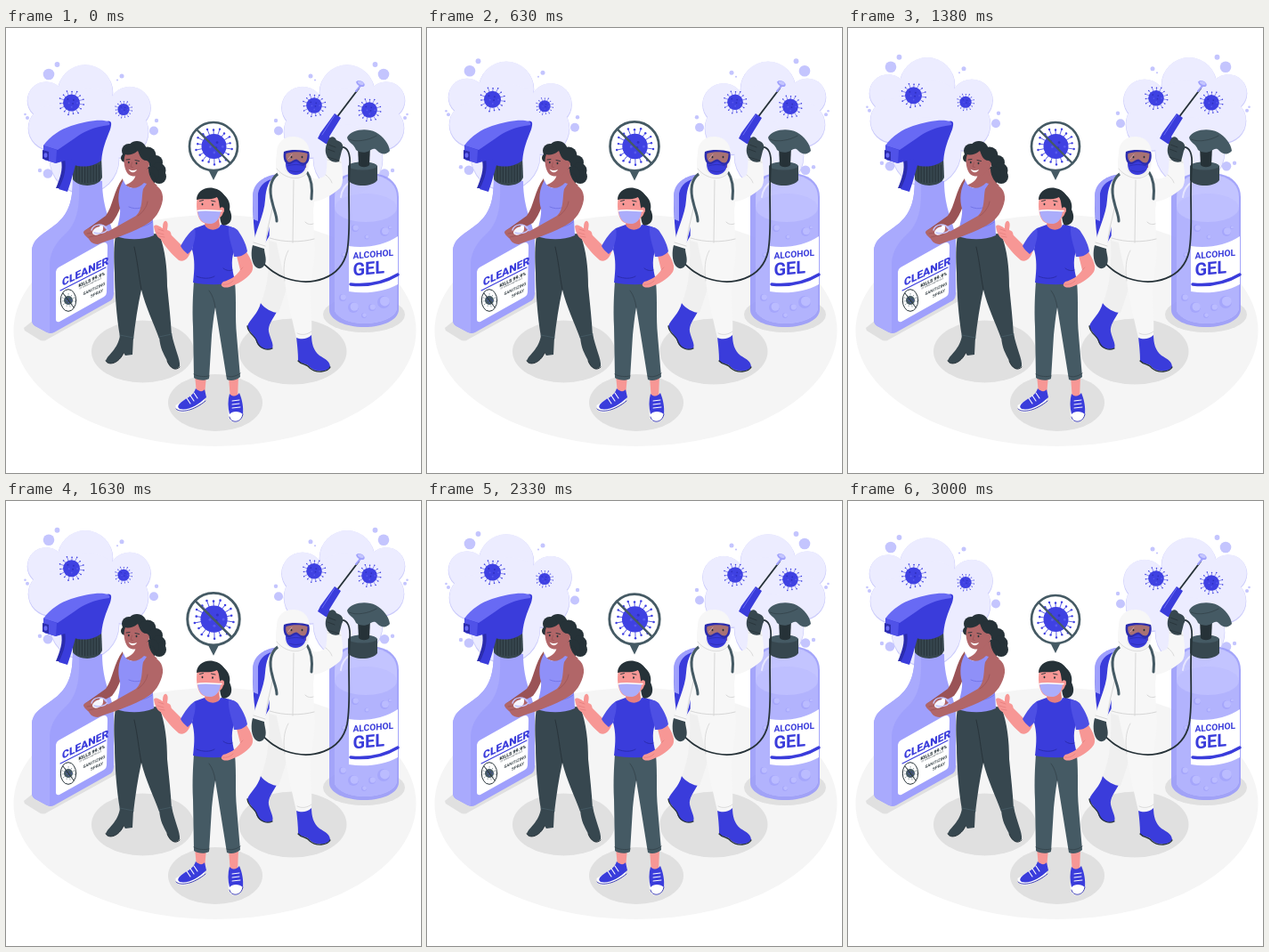
An HTML page with a canvas that plays this animation: 466 px wide and 500 px high, repeating every 3040 ms.

```html
<!DOCTYPE html>
<html lang="en">
<head>
<meta charset="utf-8">
<title>Sanitizing team</title>
<style>
html, body { margin: 0; width: 100%; height: 100%; overflow: hidden; background: #fff; }
canvas { display: block; width: 466px; height: 500px; }
</style>
</head>
<body>
<canvas id="stage"></canvas>
<script>
const canvas = document.getElementById('stage');
const ctx = canvas.getContext('2d');
const ratio = window.devicePixelRatio || 1;
canvas.width = 466 * ratio;
canvas.height = 500 * ratio;

const BLUE = '#3a3cdb', NAVY = '#2b2cae', SKY = '#686af4', LILAC = '#9fa0fc', PALE = '#ececff';
const SLATE = '#455a64', DARK = '#37474f', INK = '#263238';
const BROWN = '#b16668', BROWN2 = '#9a5356', SKIN = '#f79795', SKIN2 = '#e57f7f';
const SUIT = '#f7f7f7', SUIT2 = '#efefef', SUIT3 = '#d6d6d6';

function fill(color, d) {
  ctx.fillStyle = color;
  ctx.fill(new Path2D(d));
}
function line(color, width, d) {
  ctx.strokeStyle = color;
  ctx.lineWidth = width;
  ctx.stroke(new Path2D(d));
}
function oval(color, x, y, rx, ry = rx, turn = 0) {
  ctx.fillStyle = color;
  ctx.beginPath();
  ctx.ellipse(x, y, rx, ry, turn, 0, 7);
  ctx.fill();
}
function ring(color, width, x, y, rx, ry = rx) {
  ctx.strokeStyle = color;
  ctx.lineWidth = width;
  ctx.beginPath();
  ctx.ellipse(x, y, rx, ry, 0, 0, 7);
  ctx.stroke();
}
function label(str, x, y, size, weight, slope, color = BLUE) {
  ctx.save();
  ctx.transform(1, slope, 0, 1, x, y);
  ctx.font = `${weight} condensed ${size}px Roboto, "Open Sans", sans-serif`;
  ctx.fillStyle = color;
  ctx.fillText(str, 0, 0);
  ctx.restore();
}

function virus(x, y, r, spikes = 15, body = '#3f41e2') {
  for (let i = 0; i < spikes; i++) {
    const a = i / spikes * Math.PI * 2 + 0.15;
    const len = r * (i % 2 ? 1.32 : 1.46);
    const px = x + Math.cos(a) * len, py = y + Math.sin(a) * len;
    line(body, r * 0.06, `M${x} ${y}L${px} ${py}`);
    oval(body, px, py, r * 0.085);
  }
  oval(body, x, y, r);
  for (let i = 0; i < 6; i++) {
    const a = i * 2.4 + 0.6, d = r * (0.2 + 0.1 * i);
    oval(i % 2 ? '#5759ec' : '#3031c0', x + Math.cos(a) * d, y + Math.sin(a) * d, r * 0.1);
  }
}

const LOBES = [[89, 72, 31], [45, 81, 21], [139, 89, 23.5], [50, 112, 25], [130, 116, 30], [92, 112, 45], [88, 147, 39]];
const DROPS = [[48, 52, 6.3], [57.5, 41, 2.9], [130, 54, 2.5], [125, 58.5, 1.1], [166, 115.5, 5],
  [169, 104, 2.2], [24, 101, 2], [21.5, 97, 1.3], [47, 163.5, 5.3], [38, 160, 2.2]];

function cloud(flip) {
  const at = x => flip ? 472 - x : x;
  for (const [x, y, r] of LOBES) oval('#c9c9fb', at(x), y + 0.8, r + 0.3);
  for (const [x, y, r] of LOBES) oval(PALE, at(x), y, r - 0.2);
  for (const [x, y, r] of DROPS) oval('#c4c5fe', at(x), y, r);
}

function ground() {
  oval('#f5f5f5', 234.5, 340, 226, 130);
}

function shadows() {
  oval('#e0e0e0', 153.5, 363.5, 57.5, 35);
  oval('#e0e0e0', 235, 421, 53, 32);
  oval('#e0e0e0', 322, 363.5, 60.5, 37);
}

function sprayBottle() {
  fill('#e0e0e0', 'M20 337L30 329L122 297L124 307L46 350Q42 353 37 350L21 340Z');
  fill(LILAC, 'M75 165C75 190 73 205 58 219C42 232 29 236 29 252L29 328Q29 333 33 335L46 342Q50 344 54 342L118 306Q121 303 121 298L121 238C120 220 108 205 108 172Z');
  fill('#a9aafd', 'M75 165C75 190 73 205 58 219C42 232 29 236 29 252L29 328Q29 333 33 335L46 342L49 342L49 264C50 250 57 240 68 230C80 218 83 200 82 175Z');
  // label
  fill('#fff', 'M56 274Q56 271 59 269L107 242Q114 239 114 246L113 297Q113 300 110 302L60 330Q56 331 56 327Z');
  label('CLEANER', 63, 290, 12, 800, -0.48);
  line(BLUE, 1.1, 'M61 295L112 269');
  label('KILLS 99.9%', 81.5, 291.5, 5.2, 900, -0.48, INK);
  label('OF GERMS AND MOULD', 82.5, 293.7, 2.3, 400, -0.48, INK);
  label('SANITIZING', 86.5, 300.5, 4.6, 500, -0.48, INK);
  label('SPRAY', 95, 303, 4.6, 500, -0.48, INK);
  virus(70, 306, 5, 11, SLATE);
  ring(INK, 1, 70, 306, 8.7, 12.3);
  line(INK, 1, 'M64 298L76 314');
  // collar
  fill(DARK, 'M75 150L107 143L108 168C104 179 82 180 75 170Z');
  for (let x = 79; x < 107; x += 3.2) line(INK, 0.9, `M${x} 154L${x} ${174 - Math.abs(x - 90) * 0.15}`);
  // head and trigger
  fill(NAVY, 'M62 149L74 146C73 160 68 172 64 180L56 180C61 168 64 159 62 149Z');
  fill(BLUE, 'M66 147L80 147C77 157 74 170 69 184L59 181C66 168 68 157 66 147Z');
  fill(BLUE, 'M42 132L63 118L112 105C119 103 119 107 117 114C112 127 109 133 107 149C98 156 86 157 77 154L73 147L56 152L43 148Z');
  fill(SKY, 'M42 132C50 121 61 114 73 110C86 106 100 103 110 104Q118 105 116 109C98 111 86 117 77 124L58 137Z');
  fill('#5052e8', 'M42 132L57 137L56 152L43 148Z');
  fill(NAVY, 'M41 137L48 139L48 149L41 147Z');
  oval(SKY, 44.5, 143, 2, 2.8);
}

function gelBottle() {
  oval('#e0e0e0', 402, 322, 46, 20);
  ctx.globalAlpha = 0.9;
  fill('#9b9cfa', 'M385 164C371 168 363 176 363 191L363 317C363 328 381 336 402 336C424 336 441 328 441 316L441 190C441 176 432 167 418 164Z');
  fill('#c6c7ff', 'M386 166C376 169 369 177 369 191L369 318C374 327 388 332 402 332C421 332 438 325 439 315L439 190C439 177 430 169 417 166Z');
  ctx.globalAlpha = 1;
  fill('#b2b3fd', 'M369 201C378 211 426 211 439 201L439 315C438 325 420 332 402 332C387 332 374 327 369 318Z');
  oval('#bebfff', 404, 202, 35, 16);
  line('#e5e5ff', 2, 'M376 190C377 181 381 176 387 173');
  for (const [x, y, r] of [[392, 225, 4], [425, 229, 5], [405, 235, 2.5], [378, 303, 4], [390, 314, 6], [411, 314, 4], [424, 308, 7], [402, 323, 3], [379, 255, 2.5], [431, 224, 2]]) {
    oval('#a5a6fb', x, y, r);
    oval('#bbbcff', x + r * 0.2, y - r * 0.15, r * 0.78);
  }
  fill('#fff', 'M385 245C404 248 425 244 440 234L440 288C424 297 403 299 385 296Z');
  line(BLUE, 3.4, 'M387 288C407 290 425 286 440 277');
  label('ALCOHOL', 389.5, 259.5, 10.2, 700, -0.08);
  label('GEL', 389.5, 278.5, 20, 700, -0.09);
  // pump
  fill(DARK, 'M384 155C390 149 411 149 417 155L417 171C411 179 390 179 384 171Z');
  oval(SLATE, 400.5, 155, 16, 4.5);
  fill(INK, 'M395 134L409 134L408 154C405 157 399 157 396 154Z');
  fill(SLATE, 'M383 123C387 114 405 112 415 117C424 122 430 130 431 138C427 143 421 142 417 138C414 134 411 136 408 138C403 141 397 140 393 137C391 130 384 129 383 123Z');
  line(DARK, 1, 'M385 125C393 129 408 126 416 121');
}

function woman() {
  for (const [x, y, r] of [[147, 138, 11], [138, 138, 8], [134, 146, 5], [159, 143, 9.5], [168, 151, 8], [171, 160, 8.5], [172, 167, 8], [163, 164, 9], [160, 170, 8]]) oval(INK, x, y, r);
  // far arm
  fill(BROWN2, 'M131 169C121 182 120 200 112 211L88 228C86 232 90 234 94 232L119 219C127 209 132 194 133 181Z');
  // boots and trousers
  fill(DARK, 'M128 345L143 347L142 367L134 368L132 365C127 377 115 380 112 374C114 367 126 361 128 345Z');
  fill(DARK, 'M172 347L186 343C189 360 196 372 195 380C190 386 184 382 181 374C177 366 173 360 172 347Z');
  line(INK, 1, 'M112 374C115 380 127 377 132 365M181 374C184 382 190 386 195 381');
  fill(DARK, 'M123 233L172 231C179 250 181 270 181 290C183 310 185 328 186 346L172 349C166 332 157 314 152 294C148 312 145 332 143 350L128 347C124 325 122 295 122 275C121 258 121 245 123 233Z');
  line(INK, 0.9, 'M152 294C149 278 148 264 144 246');
  line(SLATE, 0.9, 'M128 345L143 348M172 347L186 344');
  // top
  fill(BROWN, 'M146 160L160 158C160 168 166 174 170 177L157 185L133 177C140 174 147 170 146 160Z');
  fill('#8f90f8', 'M132 171C134 181 147 183 155 174C164 176 166 186 164 198L166 233C152 239 136 238 123 234C125 222 129 211 128 203C125 193 126 180 132 171Z');
  line('#7476e8', 1, 'M138 201C147 205 156 202 160 195M164 218C156 224 146 225 138 222');
  // face
  fill(BROWN, 'M134 142C131 149 133 159 137 164C143 169 153 166 156 160C161 158 163 151 158 149C151 149 150 142 148 138C142 143 137 143 134 142Z');
  oval(INK, 137.8, 151, 0.9, 1.3);
  oval(INK, 146.5, 152, 0.9, 1.3);
  line(INK, 0.9, 'M135 148L139 147.5M145 148.5L149.5 149.5');
  line(BROWN2, 0.8, 'M141.5 151L140 156L142.5 156.5');
  fill('#fff', 'M137.5 158.5C141 160.5 144 160.5 147 159C145 163.5 139.5 163 137.5 158.5Z');
  // near arm
  fill(BROWN, 'M158 175C170 174 177 182 176 193C174 205 167 216 157 221C143 229 126 235 114 239L103 243C97 243 93 239 92 234C98 232 107 231 114 229L146 211C154 204 152 189 154 181Z');
  line(BROWN2, 0.8, 'M148 211C154 207 158 201 159 195');
  // hands and lather
  fill(BROWN, 'M87 229C92 224 101 222 109 223L116 230L102 239C94 239 88 234 87 229Z');
  line(BROWN2, 0.8, 'M91 231L103 229M93 235L107 232');
  oval('#f5f5ff', 103, 228, 6.5, 4, -0.5);
  line('#c4c5fe', 1.4, 'M96 227C98 220 108 219 113 225M99 230C105 232 111 230 114 227');
  oval('#fff', 107, 224, 2.3);
}

function girl() {
  fill(SKIN, 'M212 390L225 391L223 412L214 411Z');
  fill(SKIN, 'M250 392L261 391L260 418L252 418Z');
  // sneakers
  fill('#fff', 'M190.5 424C190 433 201 433 207 429L222 420L224 413L216 408Z');
  fill(BLUE, 'M213 405C217 409 221 409 223 406L225 415C215 424 205 430 195 428C190 425 196 420 205 415C209 412 212 409 213 405Z');
  line('#fff', 1.1, 'M207 413L211 419M211 410L215 416M203 416L207 422');
  line(NAVY, 0.9, 'M191 428C196 433 211 430 224 419');
  fill('#fff', 'M250 424C249 438 250 443 258 443C266 442 267 432 266 424Z');
  fill(BLUE, 'M251 411C255 415 259 414 262 410C265 417 267 426 266 434C262 430 254 430 251 434C249 426 249 418 251 411Z');
  line('#fff', 1, 'M254 419L262 418M254 423L262 422M254 427L263 426');
  line(NAVY, 0.9, 'M251 437C252 444 264 445 266 434');
  // trousers
  fill(SLATE, 'M211 284L257 285C259 308 257 325 259 345L263 392C259 396 252 397 248 395L240 345L235 314C233 325 232 335 231 345L228 394C223 397 215 396 211 393L210 335C209 315 210 299 211 284Z');
  line(DARK, 1, 'M235 314C234 307 232 300 228 295M211 389C216 392 223 392 228 391M248 391C253 393 259 391 263 388');
  // raised arm
  fill(SKIN, 'M183 230L197 244L208 249C206 258 200 264 194 261C186 254 178 245 173 236Z');
  fill(SKIN, 'M166 223C168 219 174 224 176 225C176 220 177 216 180 217C183 219 181 225 181 227C187 228 187 236 181 238C173 239 168 235 166 223Z');
  line(SKIN2, 0.8, 'M171 226L177 228M170 230L177 232M172 234L178 235');
  // ponytail, neck, shirt
  fill(INK, 'M236 184C247 185 253 196 251 204C256 214 252 222 243 222C239 216 241 207 238 201Z');
  fill(SKIN2, 'M224 214L239 212L240 222C237 230 226 228 223 222Z');
  fill(BLUE, 'M212 225L223 221C226 228 238 229 241 221C250 222 257 224 260 228L256 251C252 262 254 274 258 286C243 289 224 289 210 286C212 270 212 260 209 249Z');
  line(NAVY, 1, 'M214 279C221 282 229 282 234 279M244 270C248 273 251 273 254 272');
  // hand on hip
  fill(SKIN, 'M258 252L269 250C276 261 279 268 276 274C270 283 259 288 251 291C243 293 239 289 244 285C252 283 258 279 263 272Z');
  line(SKIN2, 0.8, 'M243 288C248 289 252 287 255 284M263 272L266 269');
  // sleeves
  fill('#4d4fe4', 'M212 225C206 229 201 236 196 245C198 249 201 251 204 254L209 249C211 241 214 233 212 225Z');
  fill('#4d4fe4', 'M250 223C257 224 260 226 262 230C267 237 270 245 271 251C267 256 262 257 256 257C255 247 249 236 250 223Z');
  // head
  fill(SKIN, 'M215 190C213 199 214 211 219 217C224 222 235 221 240 213C245 210 245 203 241 201C241 194 237 187 230 185C223 184 217 186 215 190Z');
  fill(INK, 'M214 193C214 184 223 178 233 180C244 182 249 191 247 201L241 205C239 199 240 195 237 190C229 194 219 191 214 193Z');
  oval(SKIN, 242.5, 204.5, 2.5, 3.2);
  oval(INK, 220.5, 198, 0.9, 1.3);
  oval(INK, 232, 198.5, 0.9, 1.3);
  line(INK, 0.9, 'M217.5 194.5L221.5 193.5M230.5 194L235 195');
  fill('#abadfb', 'M215 205C221 204 230 205 241 206C240 213 237 219 230 220C222 220 216 216 215 205Z');
  line('#fff', 1.5, 'M215 205.5C221 204 230 205 242 205.5');
}

function worker() {
  // tank
  fill(BLUE, 'M278 184C281 172 292 166 305 165L308 214L288 246L281 242C277 222 277 200 278 184Z');
  fill(LILAC, 'M277 188C278 172 292 166 305 164L306 168C292 170 285 176 283 186L283 217L278 215Z');
  // boots
  fill(BLUE, 'M286 309L304 319C299 328 294 334 295 341C297 350 301 355 299 360C291 363 283 359 281 352C279 345 273 342 271 335C274 327 283 321 286 309Z');
  line(INK, 1.3, 'M271 335C272 344 280 345 282 353C285 360 293 363 299 360');
  fill(BLUE, 'M326 347L343 343C343 355 345 362 352 368C359 372 364 375 364 381C360 387 347 387 341 381C338 376 331 378 328 374C328 365 327 356 326 347Z');
  line(INK, 1.3, 'M328 374C332 379 338 377 341 382C348 388 361 387 364 381');
  // legs
  fill(SUIT2, 'M295 238L327 240C323 268 316 291 306 320C299 320 290 315 286 309C295 289 296 264 295 238Z');
  fill(SUIT, 'M303 238L346 236C349 257 343 275 342 295C342 312 344 330 343 345C338 350 331 350 326 348C321 326 315 302 313 284Z');
  line(SUIT3, 0.9, 'M313 284C311 271 312 259 317 250M327 343C333 346 339 344 343 341');
  // raised arm
  fill(SUIT, 'M337 166C348 172 355 169 359 165C361 156 360 149 361 143L376 146C378 161 380 174 375 180C366 188 353 196 342 195Z');
  line(SUIT3, 0.9, 'M359 165C363 168 365 171 366 174M361 148L376 151');
  // torso
  fill(SUIT, 'M302 166C312 161 331 162 340 166C348 175 347 190 345 205L346 241C331 244 312 244 296 239C295 222 297 210 296 195Z');
  line(SUIT3, 1, 'M323 170L322 241M296 236C312 241 331 241 346 237M336 218C339 221 342 221 345 220');
  // lowered arm
  fill(SUIT, 'M303 166C295 170 292 180 291 193C290 210 280 228 277 245L290 249C293 233 299 214 301 199Z');
  line(SUIT3, 1, 'M300 196C299 208 294 221 292 236M278 241L291 245');
  // straps
  line(SLATE, 3, 'M305 164C295 172 296 185 299 196C301 205 304 210 304 217');
  line(SLATE, 3, 'M338 162C344 171 344 183 343 192');
  // hood
  fill(SUIT, 'M304 140C304 128 313 121 324 122C336 123 342 132 341 145C342 155 339 164 333 168C322 173 310 170 305 164C302 157 303 148 304 140Z');
  fill(SUIT2, 'M312 141C315 135 334 134 339 140C341 150 340 159 334 165C326 169 316 166 313 159Z');
  line(SUIT3, 0.9, 'M304 158C311 168 328 173 337 164');
  fill(BROWN, 'M314 141L338 141L337 157L315 157Z');
  fill(BLUE, 'M314 152C319 148 321 150 325 148C329 150 333 149 337 152C337 160 332 165 325 165C318 165 314 160 314 152Z');
  line(NAVY, 0.8, 'M316 155C321 153 330 153 335 155M318 160C323 162 329 162 333 160');
  fill(NAVY, 'M312 139C320 136 333 137 340 139C342 145 340 153 335 154C330 154 328 150 326 150C323 150 320 154 316 153C312 151 311 145 312 139Z');
  fill('#a87274', 'M314.5 141C322 138.5 332 139 338.5 141C338.5 147 337 151.5 334 151.5C330 151.5 328 147.5 326 147.5C323 147.5 320 151.5 317 150.5C315 149 313.5 145 314.5 141Z');
  oval(INK, 320.5, 145, 0.9, 1.2);
  oval(INK, 332.5, 145, 0.9, 1.2);
  line('#d3a9ab', 0.9, 'M317 147L321 142');
  // hose and glove
  line(INK, 1.8, 'M376 134C384 133 387 142 386 155C383 193 388 224 383 251C376 282 343 291 314 281C300 276 294 269 286 262');
  fill(DARK, 'M277 244L290 248C290 253 293 259 291 265C288 272 282 271 279 267C275 261 275 251 277 244Z');
  // lance
  line(INK, 1.9, 'M371 101L396 68');
  line(LILAC, 2, 'M393 71L398 65');
  oval(LILAC, 398, 62.5, 5, 3, 0.45);
  oval('#c4c5fe', 398.3, 61.8, 3.6, 1.8, 0.45);
  fill(BLUE, 'M369 96L376 101L363 122C366 127 363 131 359 130L350 124L353 118Z');
  line(SKY, 1, 'M369 98L355 120');
  line(BLUE, 3, 'M358 127L372 137');
  fill(DARK, 'M362 126C364 121 369 121 371 126C378 128 380 133 377 138L374 150C368 152 363 149 361 145C357 139 359 132 362 126Z');
  line(INK, 0.8, 'M362 131L370 134M361 136L369 139M361 145L374 149');
}

// two quick beats, then a rest
function beat(p) {
  const bump = (a, top, b) => p < a || p > b ? 0 : p < top ? (p - a) / (top - a) : (b - p) / (b - top);
  return 1 + 0.1 * (bump(0, 0.1, 0.3) + bump(0.4, 0.5, 0.6));
}

function badge(scale) {
  ctx.save();
  ctx.translate(233, 137.5);
  ctx.scale(scale, scale);
  ctx.translate(-233, -137.5);
  fill(SLATE, 'M226 157L240 157L233 171Z');
  oval('#fff', 233, 133, 27);
  ring(SLATE, 2.7, 233, 133, 27);
  virus(233.5, 133, 14, 18);
  line(SLATE, 2.3, 'M214 114L252 152');
  ctx.restore();
}

function draw(sec) {
  ctx.setTransform(ratio, 0, 0, ratio, 0, 0);
  ctx.clearRect(0, 0, 466, 500);
  ctx.lineCap = ctx.lineJoin = 'round';
  ground();
  ctx.save();
  ctx.translate(0, -9 * (1 - Math.abs(sec / 1.5 - 1)));
  cloud(false);
  cloud(true);
  virus(73.5, 84, 9.5);
  virus(132, 91.5, 6.6);
  virus(346, 87, 8.8);
  virus(408, 92, 8.8);
  ctx.restore();
  sprayBottle();
  gelBottle();
  shadows();
  woman();
  worker();
  girl();
  badge(beat(sec / 1.5 % 1));
}

const LOOP = 3040, FPS = 24;
let shown = -1;
const start = performance.now();

function tick() {
  const t = (performance.now() - start) % LOOP;
  const step = Math.min(72, Math.floor((t + 3.4) * FPS / 1000));
  if (step !== shown) {
    shown = step;
    draw(step / FPS);
  }
  requestAnimationFrame(tick);
}
tick();
</script>
</body>
</html>
```
